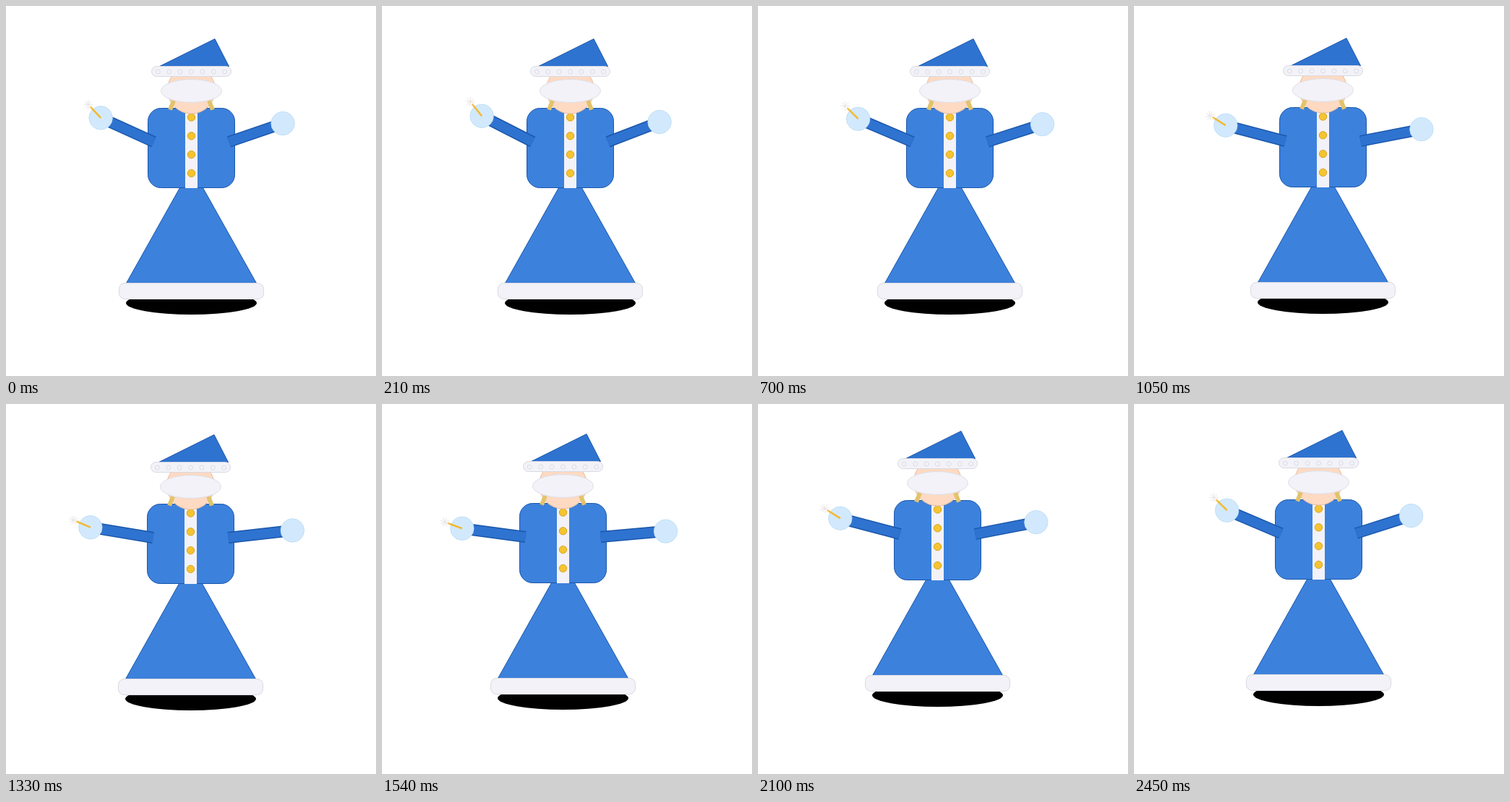
An HTML page with a canvas for the animation above (2.52 s loop, 512 by 512 pixels).

```html
<!DOCTYPE html>
<html lang="en">
<head>
<meta charset="utf-8">
<style>
  html, body { margin: 0; width: 100%; height: 100%; overflow: hidden; background: #fff; }
  canvas { display: block; width: 512px; height: 512px; }
</style>
</head>
<body>
<canvas id="stage" width="512" height="512"></canvas>
<script>
const ctx = document.getElementById('stage').getContext('2d');
const BLUE = '#3c81dc', HAT_BLUE = '#2f73d0', NAVY = '#1a57ab';
const FUR = '#f2f2f8', FUR_EDGE = '#d9d9e2';
const LOOP = 2520, STEP = 70, FRAMES = LOOP / STEP, RAD = Math.PI / 180;

function paint(fill, edge, width = 1) {
  if (fill) { ctx.fillStyle = fill; ctx.fill(); }
  if (edge) { ctx.strokeStyle = edge; ctx.lineWidth = width; ctx.stroke(); }
}

function ellipse(x, y, rx, ry, fill, edge) {
  ctx.beginPath();
  ctx.ellipse(x, y, rx, ry, 0, 0, 2 * Math.PI);
  paint(fill, edge);
}

const circle = (x, y, r, fill, edge) => ellipse(x, y, r, r, fill, edge);

function box(x, y, w, h, r, fill, edge) {
  ctx.beginPath();
  ctx.roundRect(x, y, w, h, r);
  paint(fill, edge);
}

function triangle(x1, y1, x2, y2, x3, y3, fill, edge) {
  ctx.beginPath();
  ctx.moveTo(x1, y1);
  ctx.lineTo(x2, y2);
  ctx.lineTo(x3, y3);
  ctx.closePath();
  paint(fill, edge);
}

function line(x1, y1, x2, y2, color, width) {
  ctx.beginPath();
  ctx.moveTo(x1, y1);
  ctx.lineTo(x2, y2);
  paint(null, color, width);
}

// The sleeve runs from a fixed shoulder to a hand circling the elbow.
function arm(side, elbowX, elbowY, reach, angle) {
  const x = side * (elbowX + reach * Math.cos(angle));
  const y = elbowY - reach * Math.sin(angle);
  line(side * 52, 188, x, y, NAVY, 16);
  line(side * 52, 188, x, y, HAT_BLUE, 13);
  circle(x, y, 16.2, '#d2e9fd', '#c0def6');
  return [x, y];
}

function wand(x, y, angle) {
  const dx = -Math.cos(angle), dy = -Math.sin(angle);
  line(x, y, x + 21.5 * dx, y + 21.5 * dy, '#f3b92f', 2.5);
  const sx = x + 25.5 * dx, sy = y + 25.5 * dy;
  for (let i = 0; i < 8; i++) {
    const a = angle + i * Math.PI / 4;
    line(sx, sy, sx + 6.5 * Math.cos(a), sy + 6.5 * Math.sin(a), '#e9e4e4', 1);
  }
}

function figure(swing) {
  ellipse(0, 411, 90.5, 16, '#000');
  triangle(0, 223, 90, 383.5, -90, 383.5, BLUE, NAVY);
  box(-100, 383.5, 200, 22, 8, FUR, FUR_EDGE);

  box(-60, 141.5, 120, 110, 18, BLUE, NAVY);
  box(-8.5, 141, 17, 111, 0, FUR);
  for (let i = 0; i < 4; i++) circle(0, 154 + i * 25.8, 5.2, '#f5c431', '#d9a420');

  const wandAngle = (36 + 15.6 * swing) * RAD;
  const hand = arm(-1, 87.2, 195.8, 56, wandAngle);
  arm(1, 97, 204, 51, (43.5 + 15.6 * swing) * RAD);
  wand(...hand, wandAngle);

  circle(0, 116, 33, '#ffdac2', '#e9bd9f');
  for (const side of [-1, 1]) line(side * 24.5, 131, side * 29.5, 143.5, '#e2c36c', 6);
  ellipse(0, 117.5, 42, 16, FUR, '#dedee6');

  triangle(-44, 83.5, 32.5, 45.5, 52, 83.5, HAT_BLUE, NAVY);
  box(-55, 83.5, 110, 14, 7, FUR, FUR_EDGE);
  for (let i = -3; i <= 3; i++) circle(i * 15.4, 91, 3, null, '#dcdce5');
}

function draw() {
  const step = Math.floor(performance.now() % LOOP / STEP);
  const phase = 2 * Math.PI * step / FRAMES;
  const dx = Math.trunc(10 * Math.sin(phase));
  const dy = Math.floor(5.1 * Math.cos((step - 5) * 5 * RAD) - 0.1) - 4;
  ctx.setTransform(1, 0, 0, 1, 0, 0);
  ctx.fillStyle = '#fff';
  ctx.fillRect(0, 0, 512, 512);
  ctx.translate(256.5 + dx, dy);
  figure(Math.sin(phase + Math.PI / 4));
  requestAnimationFrame(draw);
}
draw();
</script>
</body>
</html>
```
